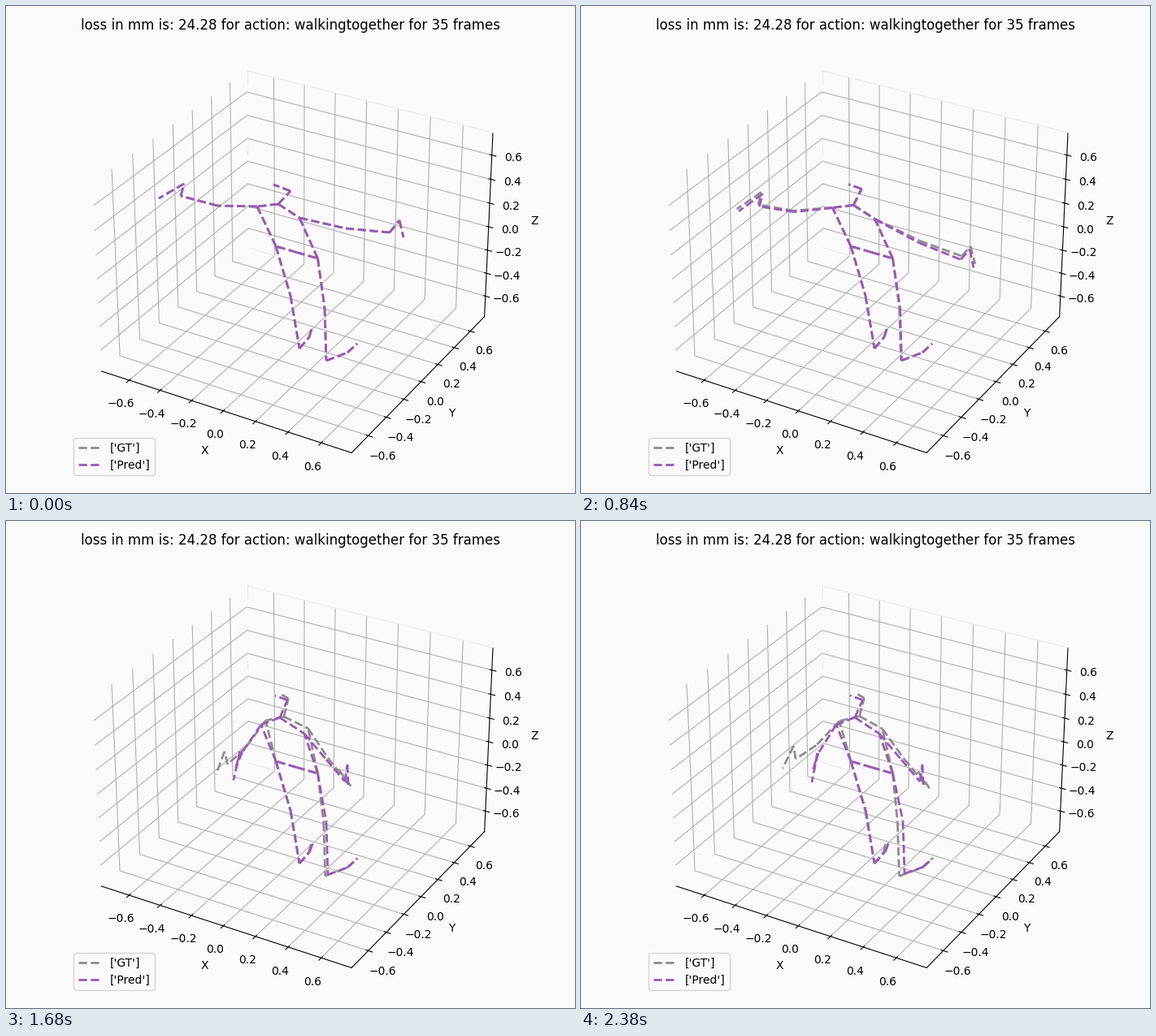
Animation, 700 px wide and 600 px high, one loop 2.45 s. Source, as a matplotlib script:

```python
import numpy as np
import matplotlib.pyplot as plt
from matplotlib.animation import FuncAnimation
from matplotlib.collections import LineCollection
from matplotlib.lines import Line2D

W, H = 700, 600
FRAMES, INTERVAL = 35, 70
BG, GREY, PURPLE, EDGE = "#fafafa", "#8e8e8e", "#9b59b6", "#ececec"
LIM = 0.78125

# Joints in screen pixels, from the body outwards
ROOT = (357.5, 303.5)
LEG_L = np.array([(332, 296), (350, 357), (361, 422), (373, 408), (376, 398)])
LEG_R = np.array([(383.5, 311), (392, 372), (394, 437), (420, 427), (432, 416)])
ARM_L = np.array([(309, 247), (260, 246), (215, 234), (219, 219), (188, 237)])
ARM_R = np.array([(361, 261), (418, 274), (472, 279), (484, 264), (489, 285)])
HEAD = np.array([(335, 244), (350, 228), (329, 220)])

# How strongly each leg joint follows the slow sway
GIVE_L = np.array([0, 0.1, 0, 0.4, 0.6])[:, None]
GIVE_R = np.array([0, 1, 1, 0.3, 0.3])[:, None]

# Each body: frame of full reach, recoil of left arm and of the rest,
# leg sway, and where the limbs end up
TRUE = dict(
    color=GREY, reach=28, recoil=(0.95, 0.4), sway=(-2.5, 0.5),
    arm_l=[(321, 245), (300, 283), (282, 307), (277, 291), (270, 320)],
    arm_r=[(372, 255), (395, 291), (418, 322), (406, 305), (422, 326)],
    head=[(343, 240), (349, 218), (341, 213)],
)
PRED = dict(
    color=PURPLE, reach=26, recoil=(0, 0), sway=(4, -2.5),
    arm_l=[(314, 251), (292, 286), (286, 306), (291, 286), (284, 322)],
    arm_r=[(367, 262), (394, 294), (417, 321), (420, 300), (421, 325)],
    head=[(337, 242), (346.5, 220.5), (331, 215)],
)


def swing(t, reach, recoil):
    """Ease from 0 to 1 at the reach, then fall back at the recoil's pace."""
    t = min(t, reach) + recoil * max(t - reach, 0)
    return np.sin(np.pi / 2 * max(t - 5, 0) / (reach - 5)) ** 2


def move(rest, end, bend, q):
    """Quadratic curve from rest to end, bowed towards rest + bend."""
    return rest + 2 * q * (1 - q) * bend + q * q * (np.array(end) - rest)


def arm_bend(arm, k):
    """The farther from the shoulder, the deeper a joint drops on its way."""
    drop = 4 + k * abs(arm[:, 0] - arm[0, 0])
    return np.column_stack([np.zeros(len(arm)), drop])


BEND_L, BEND_R = arm_bend(ARM_L, 0.2), arm_bend(ARM_R, 0.6)
BEND_HEAD = np.array([(0, 4), (-13, -6), (0, 0)])


def pose(body, t):
    """Bones of a body at a frame, each as a pair of points."""
    reach, (recoil_l, recoil) = body["reach"], body["recoil"]
    arm_l = move(ARM_L, body["arm_l"], BEND_L, swing(t, reach, recoil_l))
    arm_r = move(ARM_R, body["arm_r"], BEND_R, swing(t, reach - 2, recoil))
    head = move(HEAD, body["head"], BEND_HEAD, swing(t, reach, recoil))
    sway = np.array(body["sway"]) * (t / (FRAMES - 1)) ** 2
    leg_l, leg_r = LEG_L + GIVE_L * sway, LEG_R + GIVE_R * sway
    chains = [leg_r, leg_l, [ROOT, leg_r[0]], [ROOT, leg_l[0]],
              [leg_l[0], *arm_l], [leg_r[0], *arm_r],
              [head[0], arm_r[0]], [head[0], arm_l[0]], head]
    return [bone for c in chains for bone in zip(c[:-1], c[1:])]


fig = plt.figure(figsize=(W / 100, H / 100), dpi=100, facecolor=BG)

# Empty 3D stage
bottom, top = 15 / H, 1 - 37.2 / H
ax = fig.add_axes([0, bottom, 1, top - bottom], projection="3d", facecolor="none")
ax.view_init(elev=30, azim=-60)
ax.set(xlim=(-LIM, LIM), ylim=(-LIM, LIM), zlim=(-LIM, LIM),
       xlabel="X", ylabel="Y", zlabel="Z")
for axis in (ax.xaxis, ax.yaxis, ax.zaxis):
    axis.set_ticks(np.arange(-3, 4) / 5)
    axis.pane.set_visible(False)
ax.set_title("loss in mm is: 24.28 for action: walkingtogether for 35 frames")
handles = [Line2D([], [], color=c, lw=2, ls="--", label=f"['{name}']")
           for c, name in ((GREY, "GT"), (PURPLE, "Pred"))]
ax.legend(handles=handles, loc="lower left", facecolor=BG)

# Flat layer in screen pixels
flat = fig.add_axes([0, 0, 1, 1], facecolor="none")
flat.set(xlim=(0, W), ylim=(H, 0))
flat.axis("off")
for xs, ys in (((297, 599), (80, 156)), ((297, 297), (80, 96)),
               ((297, 297), (171, 182)), ((298, 332), (298, 308))):
    flat.plot(xs, ys, color=EDGE, lw=0.8, zorder=0)

figures = []
for body in (TRUE, PRED):
    lines = LineCollection([], colors=body["color"], linewidths=2, linestyles="--")
    flat.add_collection(lines, autolim=False)
    figures.append((lines, body))


def update(frame):
    for lines, body in figures:
        lines.set_segments(pose(body, frame))
    return [lines for lines, _ in figures]


anim = FuncAnimation(fig, update, frames=FRAMES, interval=INTERVAL,
                     repeat=True, repeat_delay=0, blit=False)
plt.show()
```
